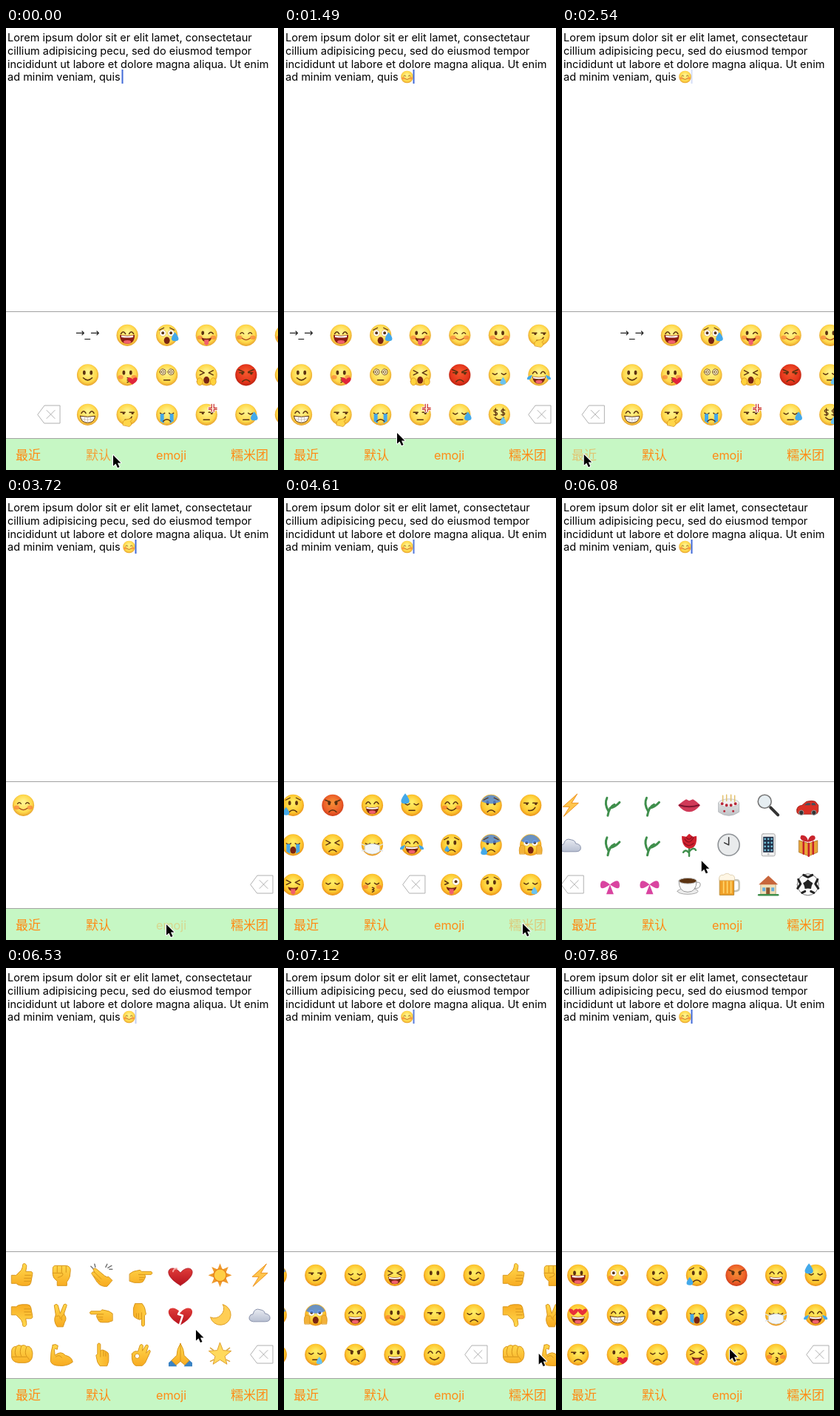
These frames come from a looping animation (368x596 px, 8000 ms). An HTML page with a canvas:

```html
<!DOCTYPE html>
<html lang="zh">
<head>
<meta charset="utf-8">
<title>Emoji keyboard</title>
<style>
html, body { margin: 0; width: 100%; height: 100%; overflow: hidden; background: #fff; }
canvas { display: block; }
</style>
</head>
<body>
<canvas id="stage" width="368" height="596"></canvas>
<script>
const ctx = document.getElementById('stage').getContext('2d');
const LOOP = 8000, STEPS = 54, STEP_TIME = 148.6;
const PAGE = 375, PITCH = PAGE / 7;

// Path helpers
const oval = (x, y, rx, ry = rx) =>
  `M${x - rx} ${y}a${rx} ${ry} 0 1 0 ${2 * rx} 0a${rx} ${ry} 0 1 0 ${-2 * rx} 0z`;
const pair = (x, y, rx, ry) => oval(-x, y, rx, ry) + oval(x, y, rx, ry);
const heart = (x, y, s) => `M${x} ${y + s}c${-2.4 * s} ${-1.4 * s} ${-s} ${-2.6 * s} 0 ${-1.4 * s}` +
  `c${s} ${-1.2 * s} ${2.4 * s} 0 0 ${1.4 * s}z`;
const drop = (x, y, s) => `M${x} ${y - s}q${s * 1.6} ${s * 2} 0 ${s * 2}t0 ${-s * 2}z`;
const dollar = x => `M${x + 2.5}-6c-6-2-6 2.5-2.5 3s3 5-2.5 3M${x}-8.500v10`;
const star = (points, outer, inner) => 'M' + Array.from({ length: points * 2 }, (_, i) => {
  const a = Math.PI * i / points, r = i % 2 ? inner : outer;
  return `${(r * Math.sin(a)).toFixed(2)} ${(-r * Math.cos(a)).toFixed(2)}`;
}).join('L') + 'z';
const shade = (top, bottom) => {
  const g = ctx.createLinearGradient(0, -14, 0, 14);
  g.addColorStop(0, top);
  g.addColorStop(1, bottom);
  return g;
};

const SKIN = shade('#ffd84c', '#f8ac22'), EDGE = '#d8951b', RED = shade('#e8453f', '#b5121d');
const BROWN = '#5b3210', BLUE = '#43a9ea', PINK = '#f0606c', GREEN = '#3f8f4c';

// Layers are [path, fill, stroke, line width]
const FEATURES = {
  // eyes
  e: [[pair(4.7, -3, 1.9, 3), BROWN]],
  i: [['M-8-2q2.500-3.500 5 0M3-2q2.500-3.500 5 0', 0, BROWN, 1.2]],
  n: [['M-8.500-2q3-5 6 0M2.500-2q3-5 6 0', 0, BROWN, 1.6]],
  u: [['M-9-2q3 3 6 0M3-2q3 3 6 0', 0, BROWN, 1.6]],
  k: [[oval(-5, -3, 1.9, 2.8), BROWN], ['M3-2q3-4 6 0', 0, BROWN, 1.5]],
  g: [[oval(6, -4, 5), '#fff', '#d9a040', .6], [oval(6, -4, 2), BROWN], ['M-9-5l5 3-5 2', 0, BROWN, 1.5]],
  w: [[pair(5.5, -3, 4.4), '#fff', '#d9a040', .6], [pair(5.5, -3, 2), BROWN]],
  h: [[heart(-6, -4, 4.7) + heart(6, -4, 4.7), '#e8303a']],
  x: [['M-9-6l6 3-6 3M9-6l-6 3 6 3', 0, BROWN, 1.5]],
  f: [['M-9-3h6M3-3h6', 0, BROWN, 1.6], [oval(-5, -1.8, 1.6) + oval(7, -1.8, 1.6), BROWN]],
  s: [[pair(5.5, -4, 4), '#fff6c8', BROWN, .8], [pair(5.5, -4, 1.8), 0, BROWN, .8]],
  $: [[dollar(-5) + dollar(5), 0, BROWN, 1.3]],
  // brows
  a: [['M-10-7l7 3M10-7l-7 3', 0, BROWN, 1.6]],
  b: [['M-10-7l6-3M10-7l-6-3', 0, BROWN, 1.2]],
  // mouths
  ')': [['M-6 4q6 6 12 0', 0, BROWN, 1.6]],
  j: [['M-5.500 4q5.500 4.500 11 0', 0, '#a8481c', 1.3]],
  '(': [['M-5 9q5-5 10 0', 0, BROWN, 1.6]],
  '-': [['M-4 7h8', 0, BROWN, 1.6]],
  '/': [['M-3 7q6 1 9-4', 0, BROWN, 1.6]],
  D: [['M-9 2q9 2 18 0q-1 10-9 10t-9-10z', '#7a2512'], [oval(0, 9.3, 4.5, 2.4), PINK], ['M-8 2.500q8 2 16 0v2q-8 2-16 0z', '#fff']],
  L: [['M-10-.5q10 2 20 0 0 12-10 12t-10-12z', '#8c1d16'], [oval(0, 9, 5, 2.4), PINK], ['M-8 .3q8 2 16 0v2.500q-8 1-16 0z', '#fff']],
  G: [['M-10 2q10 2 20 0q-1 9-10 9t-10-9z', '#fff', BROWN, 1], ['M-9 6q9 2 18 0M-4 3v7M0 3v8M4 3v7', 0, '#b9a898', .6]],
  O: [[oval(0, 7, 4, 4.8), '#7a2512']],
  o: [[oval(0, 6, 2.4, 2.8), '#7a2512']],
  P: [['M-7 3q7 3 14 0-1 6-7 6t-7-6z', '#7a2512'], ['M-3 6h6v5q-3 5-6 0z', PINK]],
  '*': [['M0 4q5 1 0 3 5 1 0 3', 0, BROWN, 1.5]],
  M: [['M-14-1l5 2M14-1l-5 2M-14 8l5-1M14 8l-5-1', 0, '#dfe5ea', 1.4], ['M-10 1q10-5 20 0v8q-10 7-20 0z', '#f4f7f9', '#c3ccd2', .8]],
  // additions
  c: [[pair(9, 3, 3.6, 2.8), 'rgba(245,90,50,.5)']],
  B: [['M-13-5a14 14 0 0 1 26 0q-13 6-26 0z', 'rgba(70,130,225,.8)']],
  t: [[drop(-9.5, 8, 5.5), BLUE]],
  p: [[drop(-6, 5, 4), BLUE]],
  T: [['M-9-1h5v13l-5-3zM9-1h-5v13l5-3z', BLUE]],
  l: [['M-9 0q-8 2-7 6 5 2 7-6zM9 0q8 2 7 6-5 2-7-6z', BLUE]],
  d: [[drop(-9, -9, 7), BLUE]],
  r: [[drop(11, 2, 6), BLUE]],
  v: [[heart(7, 8, 5), '#e0263b']],
  H: [[pair(9, 9, 4, 5), '#ffd23c', EDGE, .8]],
  A: [['M-15 12q-2-12 4-12l3 2v10zM15 12q2-12-4-12l-3 2v10z', '#f3b23a', EDGE, .8]],
  Q: [['M-6 14q-1-6 4-7l8-2q2 3-2 4 4 4-1 7z', '#ffd64a', EDGE, .8]],
  '+': [['M7-14v5h-4M10-14v5h4M7-4v-3h-4M10-4v-3h4', 0, '#fff', 3], ['M7-14v5h-4M10-14v5h4M7-4v-3h-4M10-4v-3h4', 0, '#c8281e', 1.2]],
  z: [[drop(5, 8, 5), '#69c3f2']]
};

// Centre-to-rim colours by face prefix
const FACES = {
  '.': ['#ffeb62', '#fdc72f', '#ea911a'],
  ',': ['#fff28a', '#ffd84a', '#e6a02c'],
  '!': ['#f58a35', '#ec5f28', '#cf3d1a'],
  '%': ['#f4562c', '#e5361c', '#b92210']
};

const ICONS = {
  thumb: [['M-14 0h6l7-7q2-4 2-7c0-3 6-2 5 3l-1 6h6q4 0 3 4l-2 11q-1 4-5 4h-7q-5 0-8-3h-6z', SKIN, EDGE], ['M4 0h8M3 4h9M3 8h8', 0, EDGE]],
  fist: [['M-12-9q0-4 4-4h14q6 1 6 6l-1 9q-2 5-4 7v5h-13v-6q-6-4-6-9z', SKIN, EDGE], ['M-6-12v8M0-12v8M6-12v8M-12-3h13q3 4-6 6', 0, EDGE]],
  punch: [['M-14-6q1-5 6-5 3-3 7-1 4-2 7 1 5-1 7 4 2 5 1 9-1 8-9 9h-10q-8-1-9-7z', SKIN, EDGE], ['M-8-10q-3 8 0 12M-1-11q-3 8 0 13M6-10q-3 8 0 12M-13 3h20l3 4', 0, EDGE]],
  clap: [['M-13-3q2-3 4-1l-2-4q2-3 5 0l11 9q3 2 5 1l5 5-7 8q-8 1-13-5z', SKIN, EDGE], ['M-9-4l9 9M-10 1l8 8', 0, EDGE], ['M-14-12l3 3M-9-15l1 4M8-15l-2 4M14-13l-5 3M15-8h-4', 0, '#777', 1.5]],
  point: [['M-15-2q5-4 9-4l5-1 2 2h13q3 2 0 4h-9q2 2 1 4t-2 4q-1 3-5 3h-8l-6-2z', SKIN, EDGE], ['M-3-1h8M-2 3h7M-2 6h5', 0, EDGE]],
  peace: [['M-8 0l-2-13q3-3 5 0l3 11 5-12q3-2 4 1l-4 12q5 5 1 11l-2 6h-8q-6-8-2-16z', SKIN, EDGE], ['M-7 2q5-3 5 3M4-1q-6 3-4 8', 0, EDGE]],
  muscle: [['M-12-13q4-2 7 1l-1 5q-3-2-4 0l1 8q8-7 14 0 9 2 10 9-8 6-18 5-10 0-12-6 0-13 3-22z', SKIN, EDGE], ['M-8 3q5-4 8 1', 0, EDGE]],
  ok: [['M-12-1q3-5 8-3l3-9q3-2 4 1l-1 7 5-8q3-1 3 2l-3 9 4-4q3 0 1 4l-6 13-4 4h-9q-6-3-5-16z', SKIN, EDGE], [oval(-5, 2, 3.2), '#fff', EDGE]],
  pray: [['M-9 5l-7 6v5h11zM9 5l7 6v5h-11z', '#3a83c4'], ['M0-15q-5 8-5 16l-7 7 6 6 6-5 6 5 6-6-7-7q0-8-5-16z', SKIN, EDGE], ['M0-14v23', 0, EDGE]],
  heart: [[heart(0, 1.5, 12.2), RED, '#a8141f', .8], ['M-10-5q1-4 5-4', 0, '#f6a09c', 2]],
  broken: [[heart(0, 1.5, 12.2), RED], ['M1-8l-4 7 6 2-4 12', 0, '#fff', 2.5]],
  sun: [[star(8, 16, 8.5), '#ef9a2c'], [oval(0, 0, 8.5), '#ffcf45', '#e8861c', 1.5]],
  bolt: [['M9-15L-10 2h9l-8 13L11-3h-9z', '#ffc54c', '#ed9320']],
  moon: [['M4-14a14 14 0 1 1-17 17a13 13 0 0 0 17-17z', '#ffce55', '#dfa028']],
  cloud: [['M-9 9q-6-1-5-6 1-4 5-4 2-9 10-6 6 1 6 5 7 1 7 6t-6 5z', shade('#fafbfd', '#a9b2c8'), '#8790aa']],
  star: [[star(5, 16, 7), '#ffd95c', '#e0a030'], ['M-13-9l4 3M13-9l-4 3M-13 9l4-2M13 9l-4-2', 0, '#d9a540', 1.5]],
  lips: [['M-15 0q7-6 11-8l4 2 5-2q4 2 10 8-7 9-15 9t-15-9z', '#d03a58'], ['M-13 0q13 4 26 0', 0, '#7d1530', 2]],
  rose: [['M0 0v15M0 9q6-7 9-2M0 11q-5-6-8-1', 0, GREEN, 2.5], ['M-10-12l6 1 4-4 5 4 5-1q1 16-9 17-11-1-11-17z', '#cf202d'], ['M-6-8q6 9 12-2M-4-10q4 5 8-1M-7-3q6 7 13 1', 0, '#8e1020', 1.3]],
  cup: [[oval(-2, 9, 14, 4), '#ececec', '#aaa'], ['M-14-5h24q0 15-12 15t-12-15zM10-3q6-1 5 4t-8 4', '#fafafa', '#999'], [oval(-2, -5, 12, 3.8), '#5b3210', '#bbb']],
  cake: [['M-14-3v12q14 10 28 0v-12z', shade('#f5f5f5', '#bfc3c6'), '#aeb2b5', .8], [oval(0, -3, 14, 5.5), '#f1f1f1', '#bbbfc2', .8], ['M-8-5v-8M-3-6v-8M3-6v-8M8-5v-8', 0, '#e2bf6a', 1.5], [pair(9, -2, 2) + pair(3, 0, 2) + pair(6, 8, 1.5), '#b8283a']],
  clock: [[oval(0, 0, 14.5), '#e9ebec', '#8f9397', 1.6], ['M0 0v-10M0 0l-6-3', 0, '#333', 1.5]],
  beer: [['M7-6h4q3 0 3 4v7q0 4-7 4', 0, '#c4c4b8', 2.5], ['M-12-8h19v22h-19z', '#f0a028', '#ba8423'], ['M-7-4v15M-2-4v15M3-4v15', 0, '#ffd56a', 1.8], ['M-13-6q-1-8 6-7 5-4 9 0 7-1 6 7z', '#fff6e4', '#d8c8a8', .8]],
  lens: [['M3 3l10 10', 0, '#333', 4], [oval(-5, -5, 9), '#e6eef2', '#777', 1.6]],
  phone: [['M-7-15h14q2 0 2 2v26q0 2-2 2h-14q-2 0-2-2v-26q0-2 2-2z', '#f0f0f0', '#aaa'], ['M-7-11h14v21h-14z', '#23324a'], [[-8, -3, 2, 7].map(y => oval(0, y, 1.4) + pair(4.5, y, 1.4)).join(''), '#74c2d8'], [oval(0, 12.5, 1.3), '#bbb']],
  house: [['M-10-1h20v14h-20z', '#f1e0b8', '#b29c70', .8], ['M0-12l13 12h-26z', '#c8663c'], ['M-3 4h5v9h-5z', '#8c5630'], ['M-8 4h4v5h-4zM4 4h4v5h-4z', '#66aedb'], ['M-13 14h26', 0, GREEN, 2.5]],
  car: [['M-15 6q0-5 7-6l6-5q8-2 12 0l4 5v8q-1 4-4 4h-21q-5 0-4-6z', '#da3025', '#931a14', .8], ['M-5 0l4-3h4v3zM5-3h4l2 3h-6z', '#43515b'], [oval(-9, 10, 3.2) + oval(8, 10, 3.2), '#333', '#999']],
  gift: [['M-12-6l13 4 12-4v16l-12 5-13-5z', '#e8a63a', '#a86d18', .8], ['M1-2v17M-6-4v16M7-4v16', 0, '#c71f2b', 2.5], ['M0-4q-14-2-9-9 7-1 9 7 3-9 9-6 4 6-9 8z', '#c9252d']],
  ball: [[oval(0, 0, 14.5), '#fafafa', '#777'], [star(5, 7, 5.2), '#222'], ['M-6-13l6 3 6-3M13-7l-3 6 4 6M-13-7l3 6-4 6M-8 11l4-2M8 11l-4-2', 0, '#222', 3]],
  bomb: [[oval(-4, 4, 11), '#292d33'], ['M3-6l3 3', 0, '#444', 5], ['M6-6q2-5 7-5', 0, '#b99a6a', 1.8], [star(8, 4, 2).replace('M', 'M'), 0, '#f79a28', .1], [oval(13, -11, 2.5), '#f79a28'], [oval(-8, 0, 3, 2), '#818890']],
  gem: [['M-9-10h18l6 7-15 15-15-15z', '#70c6f2', '#4099cc', .8], ['M-15-3h30M-9-10l4 7 5 15 5-15 4-7M-5-3l5-7 5 7', 0, '#dff5ff']],
  sprout: [['M-3 14q2-12 9-15M-2 8q-6-10-2-18M0 4q8-2 13-8', 0, GREEN, 3]],
  bow: [['M0 0q-12-10-13 0t13 0q12-10 13 0t-13 0l5 13h-10z', '#d944a0']],
  blob: [[oval(0, 0, 14), '#f5987c']],
  del: [['M-15 0l9-12h21v24h-21z', '#fff', '#b0b0b0'], ['M-3-5.500l11 11M8-5.500l-11 11', 0, '#b0b0b0']]
};
ICONS.bomb.splice(3, 1);

const words = s => s.trim().split(/\s+/);
const classic = words(`→_→ ,nL ,wbOr ,kPc ,icj ,ecj ,f/Q
  ,e) ,ec*v ,s- ,xOH %fa( ,u-z ,nDl
  ,nG ,f/Q ,uT( ,f-+ ,u-r ,$)z`);
const rotated = n => [...classic.slice(n), ...classic.slice(1, n + 1)].slice(0, 20);
const smileys = words(`.eL .wc- .k) .eb(t !ea( .nD .u-d
  .hD .nG .ea( .uTO .x( .uM .nDl
  .f( .k*v .u( .xP .u- .u*c`);
const moreSmileys = words(`.nc) .eBb( .f/ .u) .xD .e- .k)
  .eb(p .eBb(t .wBOA .nD .ec) .f- .u(
  .gP .ebo .u-z .ea( .eD .n)`);
const gestures = words(`thumb fist clap point heart sun bolt
  thumb/y peace point/x point/90 broken moon cloud
  punch muscle point/-90 ok pray star`);
const objects = words(`sprout sprout lips cake lens car bomb
  sprout sprout rose clock phone gift gem
  bow bow cup beer house ball`);
const PAGES = [[',icj'], classic, ...[3, 7, 11, 15].map(rotated),
  smileys, moreSmileys, gestures, objects, Array(20).fill('blob')];
const FIRST_EMOJI = 6, LAST_EMOJI = 9;

// [start, duration, from page, to page]
const SCROLLS = [
  [-204, 300, 0, 1], [2440, 300, 1, 0], [3790, 300, 0, 6], [4541, 300, 6, 10],
  [5212, 420, 10, 9], [6000, 420, 9, 8], [6860, 400, 8, 7], [7340, 400, 7, 6]
];
// [time, x, y] of the pointer tip
const POINTER = [
  [0, 144, 576], [300, 144, 576], [900, 237, 416], [1250, 237, 416], [1486, 152, 546],
  [1750, 28, 575], [2500, 28, 575], [3150, 216, 575], [3960, 216, 575], [4350, 322, 574],
  [4680, 322, 574], [5080, 110, 470], [5210, 110, 470], [5440, 375, 480], [5600, 380, 480],
  [5950, 120, 490], [6300, 310, 488], [6538, 256, 488], [6800, 130, 500], [7150, 345, 520],
  [7340, 110, 515], [7620, 320, 520], [7870, 226, 514]
];
// [label, x, tap time]
const TABS = [['最近', 13, 2360], ['默认', 108, -320], ['emoji', 203, 3640], ['糯米团', 304, 4460]];
const LINES = ['Lorem ipsum dolor sit er elit lamet, consectetaur', 'cillium adipisicing pecu, sed do eiusmod tempor',
  'incididunt ut labore et dolore magna aliqua. Ut enim', 'ad minim veniam, quis'];
const INSERTED = 1180;

const clamp = x => Math.max(0, Math.min(1, x));
const ease = x => (1 - Math.cos(Math.PI * clamp(x))) / 2;

function drawLayers(layers) {
  for (const [d, fill, stroke, width = 1] of layers) {
    const path = new Path2D(d);
    if (fill) { ctx.fillStyle = fill; ctx.fill(path); }
    if (stroke) { ctx.strokeStyle = stroke; ctx.lineWidth = width; ctx.stroke(path); }
  }
}

function drawFace([kind, ...features]) {
  const [light, middle, rim] = FACES[kind];
  const glow = ctx.createRadialGradient(0, -4, 2, 0, -1, 15.6);
  glow.addColorStop(0, light);
  glow.addColorStop(.72, middle);
  glow.addColorStop(1, rim);
  drawLayers([[oval(0, 0, 14.6), glow], ...features.flatMap(f => FEATURES[f])]);
}

function text(s, x, y, font, color) {
  ctx.font = font;
  ctx.fillStyle = color;
  ctx.fillText(s, x, y);
}

function drawCell(token, x, y, scale = 1) {
  ctx.save();
  ctx.translate(x, y);
  ctx.scale(scale, scale);
  if (FACES[token[0]]) drawFace(token);
  else if (token === '→_→') text(token, -16.5, 1.5, '15px "DejaVu Sans", sans-serif', '#222');
  else {
    const [name, turn = 0] = token.split('/');
    if (turn === 'x') ctx.scale(-1, 1);
    else if (turn === 'y') ctx.scale(1, -1);
    else ctx.rotate(turn * Math.PI / 180);
    drawLayers(ICONS[name]);
  }
  ctx.restore();
}

function drawPages(t) {
  const [start, length, from, to] = SCROLLS.filter(s => s[0] <= t).pop();
  const scroll = from + (to - from) * ease((t - start) / length);
  PAGES.forEach((cells, page) => {
    const left = (page - scroll) * PAGE;
    if (Math.abs(left) > PAGE + 20) return;
    const inset = page >= FIRST_EMOJI && page <= LAST_EMOJI ? 21.7 : 23.5;
    cells.forEach((token, i) =>
      drawCell(token, left + inset + i % 7 * PITCH, 414.3 + Math.floor(i / 7) * 53.5));
    drawCell('del', left + 346, 521);
  });
}

function drawText(t) {
  LINES.forEach((line, i) => text(line, 2, 18 + i * 17.75, '14.54px Inter, sans-serif', '#000'));
  const inserted = t >= INSERTED;
  if (inserted) drawCell(',icj', 166.5, 66, .57);
  const phase = (t / 1000 + .5) % 1;
  const blink = clamp(phase / .12) * clamp((.72 - phase) / .1);
  ctx.globalAlpha = inserted && t < 2150 ? 1 : blink;
  ctx.fillStyle = '#426bd8';
  ctx.fillRect(inserted ? 174.5 : 156.5, 56, 2, 19);
  ctx.globalAlpha = 1;
}

function drawTabs(t) {
  ctx.fillStyle = '#c6f7c4';
  ctx.fillRect(0, 553, 368, 43);
  ctx.fillStyle = '#a2a2a2';
  ctx.fillRect(0, 382, 368, 1);
  ctx.fillRect(0, 553, 368, 1);
  for (const [label, x, tap] of TABS) {
    ctx.globalAlpha = t < tap ? 1 : .3 + .7 * clamp((t - tap - 100) / 300);
    const font = label === 'emoji' ? '16.2px Inter' : '17px "Noto Sans CJK SC", "Noto Sans CJK"';
    text(label, x, 582, font + ', sans-serif', '#ff8a14');
  }
  ctx.globalAlpha = 1;
}

function drawPointer(t) {
  const found = POINTER.findIndex(p => p[0] > t);
  const next = found < 0 ? POINTER.length - 1 : found;
  const [t0, x0, y0] = POINTER[next - 1], [t1, x1, y1] = POINTER[next];
  const k = ease((t - t0) / (t1 - t0));
  ctx.save();
  ctx.translate(x0 + (x1 - x0) * k, y0 + (y1 - y0) * k);
  const arrow = 'M1 0v14.500l3.500-3 2.500 5.500 2.500-1-2.500-5.500h4.500z';
  drawLayers([[arrow, '#000', '#fff', 2], [arrow, '#000']]);
  ctx.restore();
}

function render(now) {
  const t = Math.floor(now % LOOP / LOOP * STEPS) * STEP_TIME;
  ctx.fillStyle = '#fff';
  ctx.fillRect(0, 0, 368, 596);
  ctx.lineCap = ctx.lineJoin = 'round';
  drawText(t);
  drawPages(t);
  drawTabs(t);
  drawPointer(t);
}

const began = performance.now();
(function tick() {
  render(performance.now() - began);
  requestAnimationFrame(tick);
})();
</script>
</body>
</html>
```
